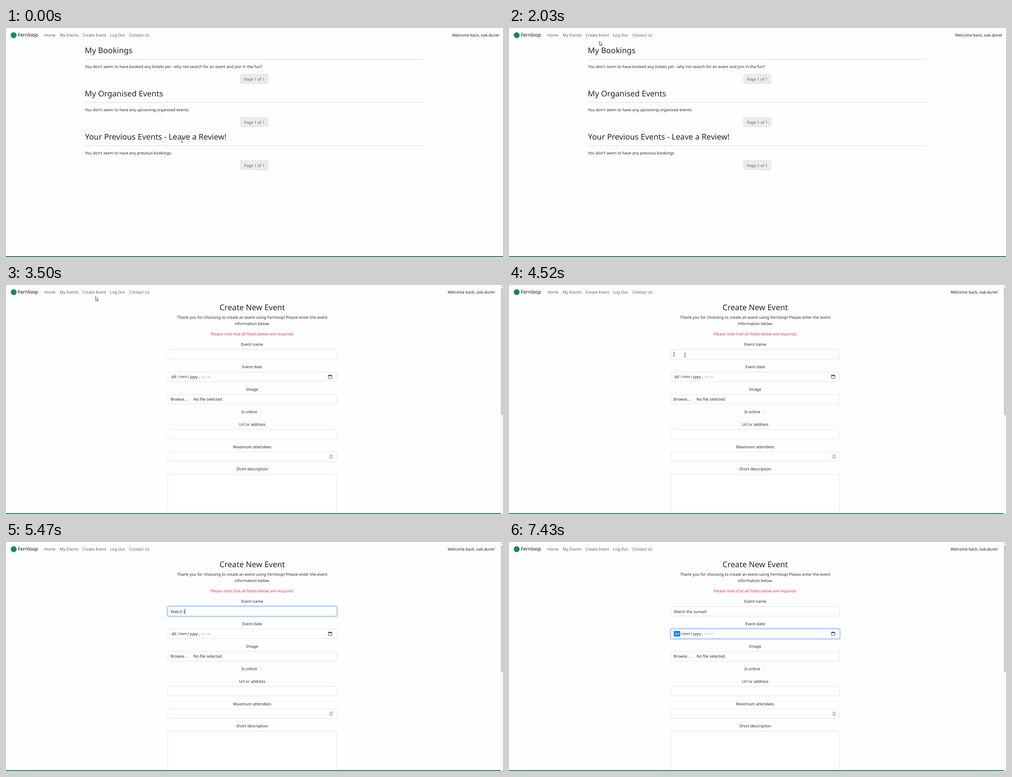
An HTML page with a canvas for the animation above (8000 ms loop, 1101 px wide and 509 px high).

```html
<!DOCTYPE html>
<html lang="en">
<head>
<meta charset="utf-8">
<title>Create an event</title>
<style>
  html, body { margin: 0; width: 100%; height: 100%; overflow: hidden; background: #fefefe; }
  canvas { display: block; width: 1101px; height: 509px; }
</style>
</head>
<body>
<canvas id="stage"></canvas>
<script>
const W = 1101, H = 509, LOOP = 8000;
const BRAND = 'Fernloop', USER = 'oak.dune', ENTRY = 'Watch the sunset!';
const HINT = 'Warm Weaving: A Starter';
const INK = '#212529', GREEN = '#198754', BG = '#fefefe', LINE = '#dee2e6';
const BODY = 8.75, TITLE = 17.48;
const MID = 545.5;

const canvas = document.getElementById('stage');
const ctx = canvas.getContext('2d');
const ratio = window.devicePixelRatio || 1;
canvas.width = W * ratio;
canvas.height = H * ratio;
ctx.textRendering = 'geometricPrecision';

// Pointer track: time, shape, x, y (held until the next entry)
const POINTER = [
  [0, 'beam', 390, 250], [280, 'beam', 389, 250], [780, 'beam', 387, 249],
  [1040, 'beam', 376, 239], [1160, 'arrow', 330, 199], [1280, 'arrow', 273, 148],
  [1410, 'arrow', 233, 113], [1530, 'arrow', 222, 103],
  [1670, 'arrow', 217, 89], [1790, 'arrow', 209, 63], [1910, 'arrow', 203, 41],
  [2030, 'arrow', 200, 29], [2160, 'hand', 198, 25], [2960, 'arrow', 198, 25],
  [3620, 'arrow', 208, 31], [3750, 'arrow', 342, 104], [3870, 'arrow', 363, 145],
  [3990, 'arrow', 373, 166], [4130, 'beam', 381, 162], [4250, 'beam', 387, 155],
  [4370, 'beam', 390, 156], [4790, 'none', 0, 0]
];

// Time and number of characters typed
const TYPING = [
  [0, 0], [4790, 1], [4910, 2], [5030, 3], [5180, 4], [5330, 6], [5470, 7],
  [5590, 9], [5740, 11], [5890, 12], [6010, 13], [6130, 14], [6250, 16], [6500, 17]
];

function latest(track, t) {
  let found = track[0];
  for (const step of track) if (step[0] <= t) found = step;
  return found;
}

function text(str, x, y, { size = BODY, color = INK, align = 'left' } = {}) {
  ctx.font = `${size}px "Noto Sans", "Open Sans", sans-serif`;
  ctx.textAlign = align;
  ctx.fillStyle = color;
  ctx.fillText(str, x, y);
}

function centred(str, y, opts) {
  text(str, MID, y, { align: 'center', ...opts });
}

function rect(x, y, w, h, color) {
  ctx.fillStyle = color;
  ctx.fillRect(x, y, w, h);
}

function box(x, y, w, h, r, fill, stroke) {
  ctx.beginPath();
  ctx.roundRect(x + 0.5, y + 0.5, w - 1, h - 1, r);
  ctx.fillStyle = fill;
  ctx.fill();
  ctx.lineWidth = 1;
  ctx.strokeStyle = stroke;
  ctx.stroke();
}

function polyline(points, color, width) {
  ctx.beginPath();
  points.forEach(([x, y]) => ctx.lineTo(x, y));
  ctx.strokeStyle = color;
  ctx.lineWidth = width;
  ctx.stroke();
}

function field(y, h = 22, focus = 0) {
  if (focus > 0.3) {
    ctx.beginPath();
    ctx.roundRect(355.7, y - 2.3, 379.6, h + 4.6, 5);
    ctx.fillStyle = `rgba(13, 110, 253, ${0.25 * focus})`;
    ctx.fill();
  }
  const edge = focus > 0.3 ? '#9cc3fb' : focus > 0 ? '#d3dcf2' : LINE;
  box(358, y, 375, h, 3.5, '#fff', edge);
}

function navBar(hover, right) {
  ctx.beginPath();
  ctx.arc(17, 16, 6.5, 0, Math.PI * 2);
  ctx.fillStyle = GREEN;
  ctx.fill();
  text(BRAND, 26.3, 19, { size: 10.7, color: '#0d0d0d' });
  const links = [['Home', 84.9], ['My Events', 119], ['Create Event', 169.8],
    ['Log Out', 230.5], ['Contact Us', 273.2]];
  for (const [label, x] of links) {
    text(label, x, 19, { color: hover && label === 'Create Event' ? '#333' : '#595959' });
  }
  text(`Welcome back, ${USER}!`, right, 19, { align: 'right', color: '#16181a' });
}

function footer(width) {
  rect(0, 507, width, 2, GREEN);
}

function section(y, title, note) {
  text(title, title[0] === 'M' ? 174.6 : 175, y + 56, { size: TITLE });
  rect(175, y + 69, 751, 1, '#d9dadb');
  text(note, 175, y + 89);
  box(519, y + 102, 62, 22, 3.5, '#e9ecef', LINE);
  text('Page 1 of 1', 550, y + 117, { align: 'center', color: '#5f6468' });
}

function eventsPage(t) {
  navBar(t >= 2310, 1092.7);
  section(0, 'My Bookings',
    "You don't seem to have booked any tickets yet - why not search for an event and join in the fun?");
  section(96, 'My Organised Events', "You don't seem to have any upcoming organised events.");
  section(192, 'Your Previous Events - Leave a Review!', "You don't seem to have any previous bookings.");
  footer(W);
}

function dateParts(selected) {
  if (selected) rect(365, 198, 14, 12, '#0078d7');
  text('dd', 366.4, 207, { color: selected ? '#fff' : INK });
  const parts = [['/', 379.8], ['mm', 384.4], ['/', 402], ['yyyy', 407.2],
    [',', 427.2], ['--', 433.6], [':', 442], ['--', 446.4]];
  for (const [str, x] of parts) text(str, x, 207);
}

function calendarIcon() {
  ctx.beginPath();
  ctx.roundRect(714, 200.5, 8, 7.5, 1);
  ctx.strokeStyle = '#4a4a4f';
  ctx.lineWidth = 1;
  ctx.stroke();
  rect(714, 200.5, 8, 2, '#4a4a4f');
  rect(715.3, 199, 1, 2, '#4a4a4f');
  rect(719.7, 199, 1, 2, '#4a4a4f');
}

function spinner() {
  rect(715, 376, 10.5, 11, '#e6e6e9');
  polyline([[718.3, 380], [720.2, 378.2], [722.1, 380]], '#66666a', 0.9);
  polyline([[718.3, 383], [720.2, 384.8], [722.1, 383]], '#66666a', 0.9);
}

function scrollBar() {
  rect(1096, 0, 5, H, '#f8f8f8');
  rect(1096, 7, 5, 282, '#cdcdcd');
  polyline([[1097.2, 4], [1099, 2.2], [1100.8, 4]], '#606060', 0.9);
}

function nameFocus(t) {
  if (t < 4520 || t >= 7430) return 0;
  if (t < 4640) return 0.2;
  return t < 7280 ? 1 : 0.85;
}

function dateFocus(t) {
  return t < 7280 ? 0 : t < 7430 ? 0.2 : 1;
}

function nameEntry(t) {
  const typed = ENTRY.slice(0, latest(TYPING, t)[1]);
  text(typed, 365, 157.5);
  if (t >= 4520 && t < 7030) {
    const caret = 365 + ctx.measureText(typed).width;
    rect(Math.round(caret), 148, 1, 12, '#3a3d40');
  }
}

function formPage(t) {
  navBar(false, 1082.7);
  centred('Create New Event', 56, { size: TITLE });
  centred(`Thank you for choosing to create an event using ${BRAND}! Please enter the event`, 75);
  centred('information below.', 89);
  centred('Please note that all fields below are required.', 112, { color: '#dc3545' });

  centred('Event name', 135);
  field(143, 22, nameFocus(t));
  nameEntry(t);

  centred('Event date', 185);
  field(193, 22, dateFocus(t));
  dateParts(t >= 7280);
  calendarIcon();

  centred('Image', 235);
  field(243);
  rect(408, 244, 1, 20, LINE);
  text('Browse...', 364.5, 257);
  text('No file selected.', 415.3, 257);

  text('Is online', 521.4, 285);
  box(559, 277, 9, 9, 2, '#fff', LINE);

  centred('Url or address', 313);
  field(320.5);
  centred('Maximum attendees', 362.5);
  field(370.5);
  spinner();
  centred('Short description', 412);
  field(420, 110);

  if (t >= 4790 && t < 5030) {
    box(358, 165, 375, 12.5, 2, '#2b2a33', '#45444d');
    text(HINT, 361, 174, { size: 6.6, color: '#fbfbfe' });
  }
  rect(0, 506, 1096, 1, BG);
  footer(1096);
  scrollBar();
}

const SHAPES = {
  arrow: new Path2D('M0 0V9.4L2.2 7.4L3.7 10.8L5.1 10.2L3.6 6.9H6.5Z'),
  hand: new Path2D('M-1 1Q0 -.4 1 1V5Q2 4.2 2.9 5.2Q4 4.6 4.8 5.6Q6.6 5.2 6.8 7V9.4L5.6 13H-.2L-3 8.6Q-2.8 7 -1 8.2Z')
};

function pointer(t) {
  const [, shape, x, y] = latest(POINTER, t);
  if (shape === 'none') return;
  ctx.save();
  ctx.translate(x, y);
  if (shape === 'beam') {
    polyline([[-2, -4.5], [2, -4.5]], '#555', 0.8);
    polyline([[0, -4.5], [0, 4.5]], '#333', 1);
    polyline([[-2, 4.5], [2, 4.5]], '#555', 0.8);
  } else {
    ctx.translate(0.4, 0.4);
    ctx.fillStyle = '#fff';
    ctx.fill(SHAPES[shape]);
    ctx.strokeStyle = '#222';
    ctx.lineWidth = 0.8;
    ctx.stroke(SHAPES[shape]);
  }
  ctx.restore();
}

function draw(t) {
  ctx.setTransform(ratio, 0, 0, ratio, 0, 0);
  rect(0, 0, W, H, BG);
  if (t < 3500) eventsPage(t);
  else formPage(t);
  pointer(t);
}

const start = performance.now();
function frame() {
  draw((performance.now() - start) % LOOP);
  requestAnimationFrame(frame);
}
frame();
</script>
</body>
</html>
```
